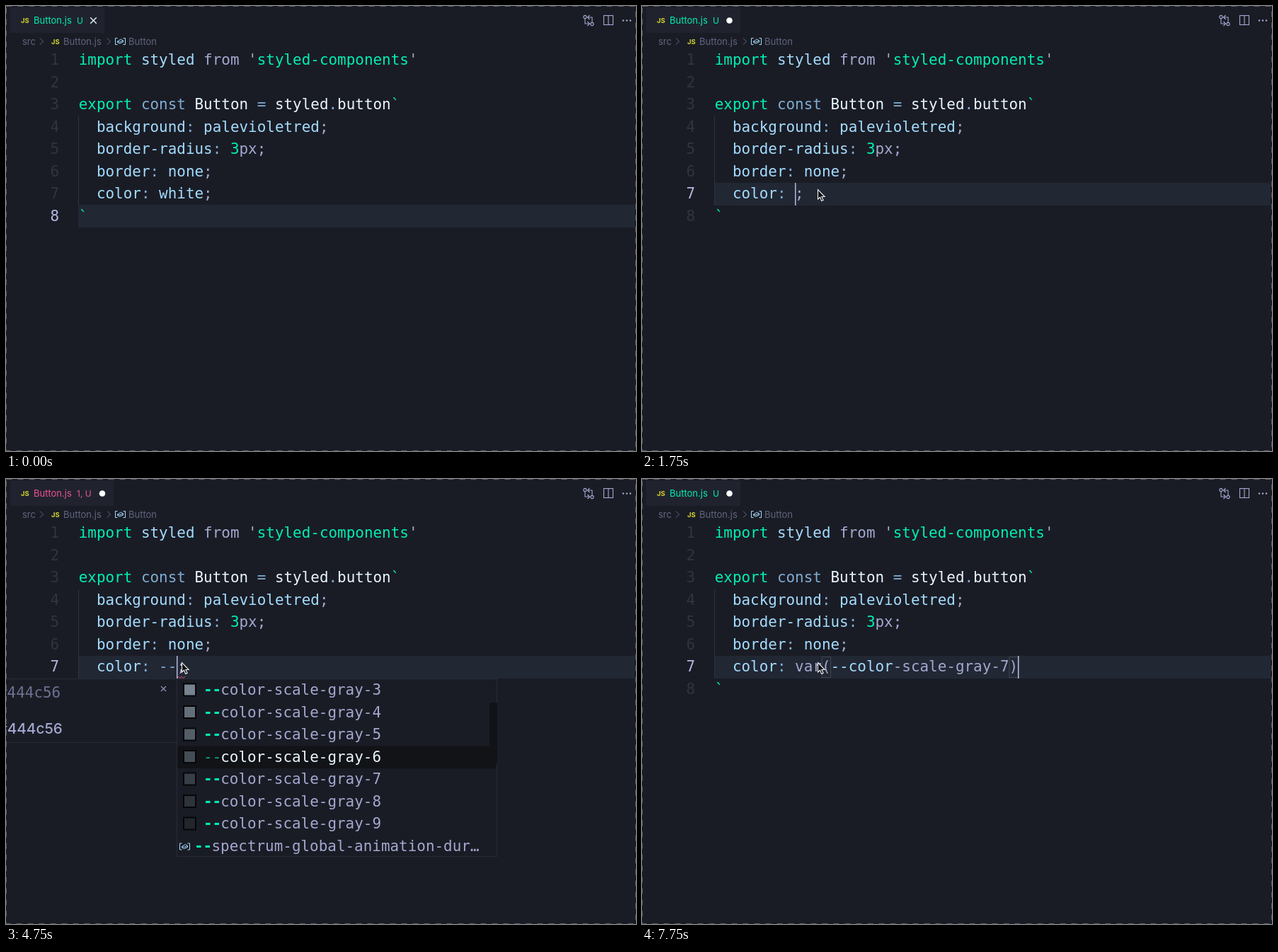
Write an HTML page with a canvas that moves like this. It is 890x629 px and loops after 8000 ms.

```html
<!DOCTYPE html>
<html lang="en">
<head>
<meta charset="utf-8">
<title>Editor autocomplete</title>
<style>
  html, body { margin: 0; width: 100%; height: 100%; overflow: hidden; background: #1a1c25; }
  canvas { display: block; }
</style>
</head>
<body>
<canvas id="stage" width="890" height="629"></canvas>
<script>
const ctx = document.getElementById('stage').getContext('2d');
const W = 890, H = 629, LOOP = 8000;
const CHAR = 12.6, LINE = 31.5, LEFT = 102.7, TOP = 61;
const MONO = '20.9px "DejaVu Sans Mono", monospace';
const MONO_BOLD = 'bold ' + MONO;
const sans = (size, weight = 400) => `${weight} ${size}px Inter, sans-serif`;

const C = {
  bg: '#1a1c25', tab: '#20232e', line: '#222734', select: '#28303e', word: '#303d4f',
  border: '#272b37', dark: '#111317', guide: '#303441', number: '#30343f',
  green: '#00eeb4', blue: '#a3dcff', steel: '#7fadd4', gray: '#a3a8cf',
  white: '#e9f5ff', dim: '#6c7190', faint: '#60657f', pink: '#f0508f', yellow: '#d2d32c'
};

const colX = col => LEFT + col * CHAR;
const lineY = n => TOP + (n - 1) * LINE;

function box(x, y, w, h, color) {
  ctx.fillStyle = color;
  ctx.fillRect(x, y, w, h);
}

function frame(x, y, w, h, color, width = 1) {
  ctx.strokeStyle = color;
  ctx.lineWidth = width;
  ctx.strokeRect(x, y, w, h);
}

function path(points, color, width = 1) {
  ctx.beginPath();
  points.forEach(([x, y]) => ctx.lineTo(x, y));
  ctx.strokeStyle = color;
  ctx.lineWidth = width;
  ctx.stroke();
}

function dot(x, y, r, color) {
  ctx.beginPath();
  ctx.arc(x, y, r, 0, 7);
  ctx.fillStyle = color;
  ctx.fill();
}

function text(str, x, y, color, font) {
  ctx.font = font;
  ctx.fillStyle = color;
  ctx.fillText(str, x, y);
}

// Monospaced text on the editor's character grid.
function mono(str, x, y, color, font = MONO) {
  [...str].forEach((ch, i) => text(ch, x + i * CHAR, y, color, font));
}

function cross(x, y, r, color) {
  path([[x - r, y - r], [x + r, y + r]], color, 1.3);
  path([[x + r, y - r], [x - r, y + r]], color, 1.3);
}

// Each run is "colorKey|text".
function code(n, runs) {
  let x = LEFT;
  for (const run of runs) {
    const [key, str] = run.split('|');
    mono(str, x, lineY(n) + 22, C[key]);
    x += str.length * CHAR;
  }
}

const SOURCE = [
  ['green|import', 'blue| styled', 'gray| from ', "gray|'", 'green|styled-components', "gray|'"],
  [],
  ['green|export', 'steel| const', 'white| Button', 'steel| = ', 'white|styled', 'steel|.', 'white|button', 'green|`'],
  ['blue|  background', 'steel|: ', 'blue|palevioletred', 'gray|;'],
  ['blue|  border-radius', 'steel|: ', 'green|3', 'gray|px;'],
  ['blue|  border', 'steel|: ', 'blue|none', 'gray|;']
];
const GRAYS = ['768390', '636e7b', '545d68', '444c56', '373e47', '2d333b', '22272e'];
const POINTER = [[250, 329.5, 245], [500, 266.5, 208], [750, 247.5, 257.5], [1000, 248, 259]];
const PICKS = [3500, 4000, 4750, 5000];

function stateAt(t) {
  const s = { t, value: ['blue|white', 'gray|;'], caretCol: 14, caret: t >= 1250, pick: 0 };
  s.active = t < 1250 ? 8 : 7;
  s.selected = t >= 1250 && t < 1750;
  s.edited = t >= 1750;
  s.error = t >= 2250 && t < 7250;
  s.popup = t >= 2250 && t < 6750;
  s.squiggle = t >= 2000 && t < 6750;
  if (t >= 6750) {
    s.value = ['gray|var(', 'blue|--color', 'gray|-scale-gray-7)'];
    s.caretCol = 34;
    s.caret = Math.floor((t - 6750) / 500) % 2 === 0;
  } else if (s.edited) {
    const dashes = t < 2250 ? 0 : t < 2500 ? 1 : 2;
    s.value = ['steel|' + '-'.repeat(dashes), 'gray|;'];
    s.caretCol = 9 + dashes;
    s.caret = t < 2500 || Math.floor((t - 2500) / 500) % 2 === 0;
    s.pick = PICKS.filter(p => t >= p).length;
  }
  return s;
}

function symbolIcon(x, y) {
  path([[x + 3, y - 4.5], [x, y - 4.5], [x, y + 4.5], [x + 3, y + 4.5]], C.blue);
  path([[x + 11, y - 4.5], [x + 14, y - 4.5], [x + 14, y + 4.5], [x + 11, y + 4.5]], C.blue);
  path([[x + 3, y], [x + 8, y - 3], [x + 11, y - 1], [x + 11, y + 1], [x + 6, y + 3], [x + 3, y + 1.5],
        [x + 3, y], [x + 6, y + 1], [x + 11, y - 1]], C.blue);
}

function header(s) {
  box(6, 2, s.error ? 146 : 133, 36, C.tab);
  const color = s.error ? C.pink : C.green;
  text('JS', 21, 23.5, C.yellow, sans(9.5, 700));
  text('Button.js', 39, 25, color, sans(13));
  text(s.error ? '1, U' : 'U', 100, 25, color, sans(12));
  const x = s.error ? 136 : 123.5;
  if (s.edited) dot(x, 20.5, 4.3, '#ffffff');
  else cross(x, 20.5, 4.3, C.white);

  text('src', 23, 55, C.faint, sans(13));
  text('JS', 64, 53.5, C.yellow, sans(9.5, 700));
  text('Button.js', 81, 55, C.faint, sans(13));
  text('Button', 173, 55, C.faint, sans(13));
  for (const cx of [48, 143]) path([[cx, 45.5], [cx + 4.5, 50], [cx, 54.5]], C.faint);
  symbolIcon(154.5, 50);

  // Toolbar: compare, split, more.
  ctx.strokeStyle = C.gray;
  ctx.lineWidth = 1.1;
  for (const [cx, cy] of [[818, 15.5], [828, 25.5]]) {
    ctx.beginPath();
    ctx.arc(cx, cy, 2.1, 0, 7);
    ctx.stroke();
  }
  path([[818, 18], [818, 25], [824, 25]], C.gray, 1.1);
  path([[821.5, 22], [824.5, 25], [821.5, 28]], C.gray, 1.1);
  path([[828, 23], [828, 16], [822, 16]], C.gray, 1.1);
  path([[824.5, 13], [821.5, 16], [824.5, 19]], C.gray, 1.1);
  frame(844.5, 13.5, 13, 13, C.gray, 1.1);
  path([[851, 13.5], [851, 26.5]], C.gray, 1.1);
  for (const cx of [872, 877, 882]) dot(cx, 20.5, 1.2, C.gray);
}

function editor(s) {
  if (!s.selected) box(102, Math.floor(lineY(s.active)), 786, 32, C.line);
  box(102, 156, 1, 125, C.guide);
  if (s.selected) {
    if (s.t >= 1500) [28, 21, 15, 15].forEach((cols, i) =>
      box(102, lineY(4 + i), cols * CHAR, LINE, C.select));
    box(colX(9), 250, 5 * CHAR, 31.5, C.word);
  }
  for (let n = 1; n <= 8; n++)
    mono(String(n), 62.5, lineY(n) + 22, n === s.active ? '#b3b9df' : C.number);
  SOURCE.forEach((runs, i) => code(i + 1, runs));
  code(7, ['blue|  color', 'steel|: ', ...s.value]);
  code(8, ['green|`']);

  if (s.t >= 6750)
    for (const col of [12, 33]) frame(colX(col) + 0.5, 251.5, 12, 29, '#414652');
  if (s.squiggle) {
    const x = colX(s.caretCol), wave = [];
    for (let i = 0; i <= 5; i++) wave.push([x + i * 2.3, i % 2 ? 279.3 : 281.5]);
    path(wave, C.pink);
  }
  if (s.caret) box(Math.floor(colX(s.caretCol)), 250, 1.5, 32, '#b4badb');
}

function suggestions(s) {
  ctx.save();
  ctx.translate((s.caretCol - 11) * CHAR, 0);

  box(0, 282, 241, 91, C.bg);
  path([[0, 282.5], [241, 282.5]], C.border);
  path([[0, 372.5], [241, 372.5]], C.border);
  const hex = '#' + GRAYS[s.pick];
  mono(hex, -11, 308.5, C.dim);
  text(hex, -11.5, 359.5, C.gray, sans(20.7, 500));
  cross(222.5, 296.5, 3.5, '#8d92b3');

  box(241, 282, 453, 252, C.bg);
  box(242, 283 + s.pick * LINE, 451, LINE, C.dark);
  frame(241.5, 282.5, 452, 251, C.border);
  box(683, 316, 11, 86, C.dark);
  GRAYS.forEach((gray, i) => {
    const y = 283 + i * LINE, on = i === s.pick;
    box(250, y + 5.5, 19, 19, '#050608');
    box(252, y + 7.5, 15, 15, '#' + gray);
    mono('--', 279, y + 22, on ? '#16a783' : C.green, on ? MONO : MONO_BOLD);
    mono(`color-scale-gray-${i + 3}`, 279 + 2 * CHAR - 1, y + 22, on ? C.white : C.gray);
  });
  const last = 283 + 7 * LINE;
  symbolIcon(245.5, last + 16);
  mono('--', 266, last + 22, C.green, MONO_BOLD);
  mono('spectrum-global-animation-dur…', 290.5, last + 22, C.gray);
  ctx.restore();
}

function pointer(t) {
  const at = POINTER.filter(p => t >= p[0]).pop();
  if (!at) return;
  const shape = [[0, 0], [0, 13.5], [3, 10.8], [5.2, 16], [7.6, 15], [5.4, 10], [9.6, 10]];
  ctx.beginPath();
  shape.forEach(([x, y]) => ctx.lineTo(at[1] + 0.5 + x, at[2] + 0.5 + y));
  ctx.closePath();
  ctx.fillStyle = '#0b0c10';
  ctx.fill();
  ctx.strokeStyle = '#f2f2f2';
  ctx.lineWidth = 1.1;
  ctx.stroke();
}

function draw(t) {
  const s = stateAt(t);
  box(0, 0, W, H, C.bg);
  header(s);
  editor(s);
  if (s.popup) suggestions(s);
  pointer(t);
  ctx.setLineDash([8, 8]);
  frame(0.5, 0.5, W - 1, H - 1, '#5a5d64');
  ctx.setLineDash([]);
}

function tick() {
  draw(performance.now() % LOOP);
  requestAnimationFrame(tick);
}
tick();
</script>
</body>
</html>
```
